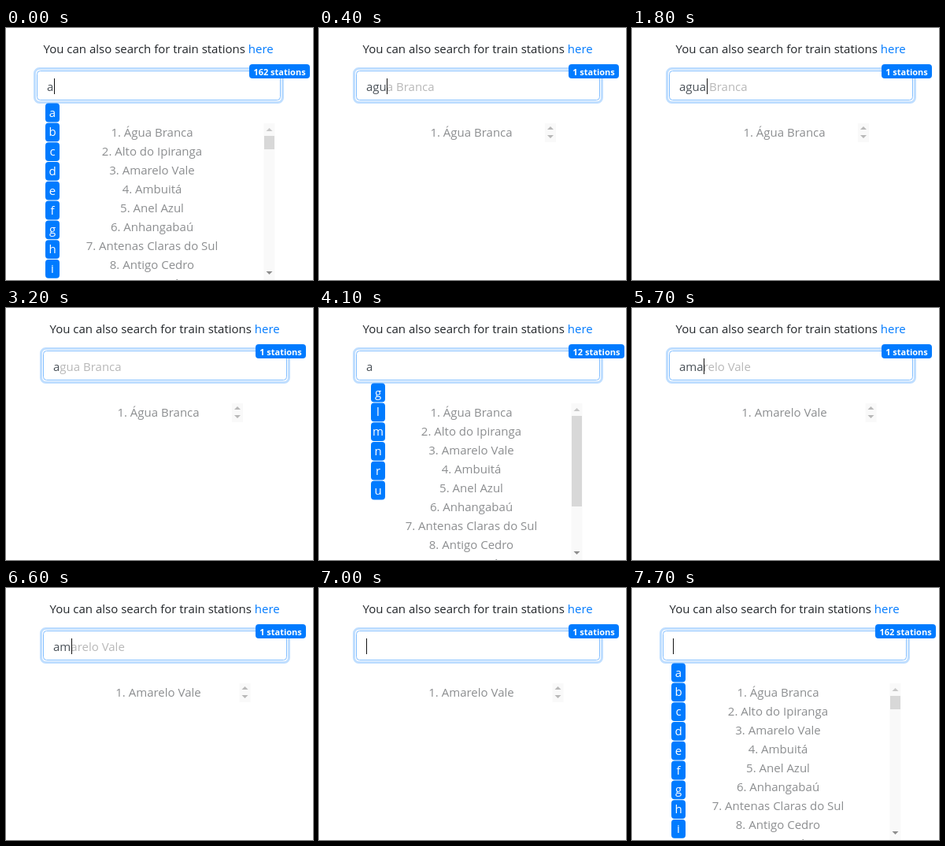
Animation of 390 by 320 pixels, one loop 8000 ms. Source, as an HTML page:

```html
<!DOCTYPE html>
<html lang="en">
<head>
<meta charset="utf-8">
<title>Station search</title>
<style>
  html, body { margin: 0; width: 100%; height: 100%; overflow: hidden; background: #fff; }
  svg { display: block; font: 15px "Open Sans", "Noto Sans", sans-serif; }
  text { white-space: pre; }
</style>
</head>
<body>
<svg id="stage" width="390" height="320"></svg>
<script>
const LOOP = 8000, BLINK = 530, BLUE = "#007bff";
const stage = document.getElementById("stage");
const pen = document.createElement("canvas").getContext("2d");

const stations = ["Água Branca", "Alto do Ipiranga", "Amarelo Vale", "Ambuitá", "Anel Azul",
  "Anhangabaú", "Antenas Claras do Sul", "Antigo Cedro", "Aracaré"];

// One view per applied query; bar is the centre of the list's scrollbar.
const views = {
  "":  { count: 162, names: stations, hints: "abcdefghi", left: 39, bar: 334.5, thumb: 17, badge: 77 },
  a:   { count: 12, names: stations, hints: "glmnru", left: 47, bar: 327.5, thumb: 115, badge: 71 },
  ag:  { count: 1, names: [stations[0]], hints: "", left: 47, bar: 294, badge: 64 },
  am:  { count: 2, names: stations.slice(2, 4), hints: "ab", left: 47, bar: 303.5, badge: 64 },
  ama: { count: 1, names: [stations[2]], hints: "", left: 47, bar: 303.5, badge: 64 }
};

// time, typed text, applied query, start of the caret's blink
const steps = [
  [0, "a", "", -100],
  [100, "ag", "a", 100],
  [200, "agu", "a", 200],
  [300, "agu", "ag", 200],
  [500, "agua", "ag", 500],
  [2300, "agu", "ag", 2300],
  [2500, "ag", "ag", 2510],
  [3100, "a", "ag", 2510],
  [3500, "a", "a", 2510],
  [4700, "am", "a", 4670],
  [5000, "am", "am", 4670],
  [5400, "ama", "am", 5430],
  [5700, "ama", "ama", 5430],
  [6400, "am", "ama", 6400],
  [6700, "a", "ama", 6600],
  [6800, "", "ama", 6600],
  [7100, "", "", 6600]
];

const rect = (x, y, w, h, fill, extra = "") =>
  `<rect x="${x}" y="${y}" width="${w}" height="${h}" fill="${fill}" ${extra}/>`;
const text = (x, y, body, fill, extra = "") =>
  `<text x="${x}" y="${y}" fill="${fill}" ${extra}>${body}</text>`;
const arrow = (x, y, dir, fill) =>
  `<path d="M${x - 4} ${y + 2 * dir}h8l-4 ${-4 * dir}z" fill="${fill}"/>`;
const middle = 'text-anchor="middle"';

function textWidth(s) {
  pen.font = '15px "Open Sans", "Noto Sans", sans-serif';
  return pen.measureText(s).width;
}

function scrollbar({ names, bar, thumb }) {
  const height = thumb ? 199 : names.length * 24;
  const [top, bottom] = thumb ? [129, 311] : names.length > 1 ? [129, 159] : [127, 138];
  return rect(bar - 7, 121, 14, height, "#f9f9f9") +
    arrow(bar, top, 1, thumb ? "#c8c8c8" : "#b8b8b8") +
    arrow(bar, bottom, -1, thumb ? "#8c8c8c" : "#b8b8b8") +
    (thumb ? rect(bar - 6.5, 137, 13, thumb, "#d8d8d8") : "");
}

function scene(typed, query, caretOn) {
  const view = views[query], { left, names } = view;
  const start = left + 13;
  const ghost = names.length === 1 && typed ? names[0].slice(typed.length) : "";
  let out = text(left + 8.5, 32,
    `You can also search for train stations <tspan fill="${BLUE}">here</tspan>`, "#212529");

  out += rect(left - 2.5, 51.5, 315, 43, "none", 'rx="6" stroke="#bfdeff" stroke-width="3"');
  out += rect(left + .5, 54.5, 309, 37, "#fff", 'rx="4" stroke="#80bdff"');
  out += text(start, 80, `${typed}<tspan fill="#b8b8b8">${ghost}</tspan>`, "#495057");
  if (caretOn) out += rect(Math.ceil(start + textWidth(typed)), 64, 1, 20, "#111");

  out += rect(left + 270, 46, view.badge, 18, BLUE, 'rx="4"');
  out += text(left + 270 + view.badge / 2, 59.5, `${view.count} stations`, "#fff",
    `${middle} font-size="11" font-weight="700"`);

  out += scrollbar(view);
  names.forEach((name, i) => {
    out += text(left + 146.5, 138 + 24 * i, `${i + 1}. ${name}`, "#8c8e90", middle);
  });

  const hintX = Math.round(start + textWidth(query)) - 2;
  [...view.hints].forEach((letter, i) => {
    const y = 95.6 + 24.8 * i;
    out += rect(hintX, y, 18, 23.8, BLUE, 'rx="4"');
    out += text(hintX + 9, y + 17, letter, "#fff", middle);
  });
  return out;
}

let shown = "";
function draw() {
  const t = performance.now() % LOOP;
  const [, typed, query, blink] = steps.findLast(step => step[0] <= t);
  const caretOn = Math.floor((t - blink) / BLINK) % 2 === 0;
  const markup = scene(typed, query, caretOn);
  if (markup !== shown) stage.innerHTML = shown = markup;
  requestAnimationFrame(draw);
}
draw();
</script>
</body>
</html>
```
